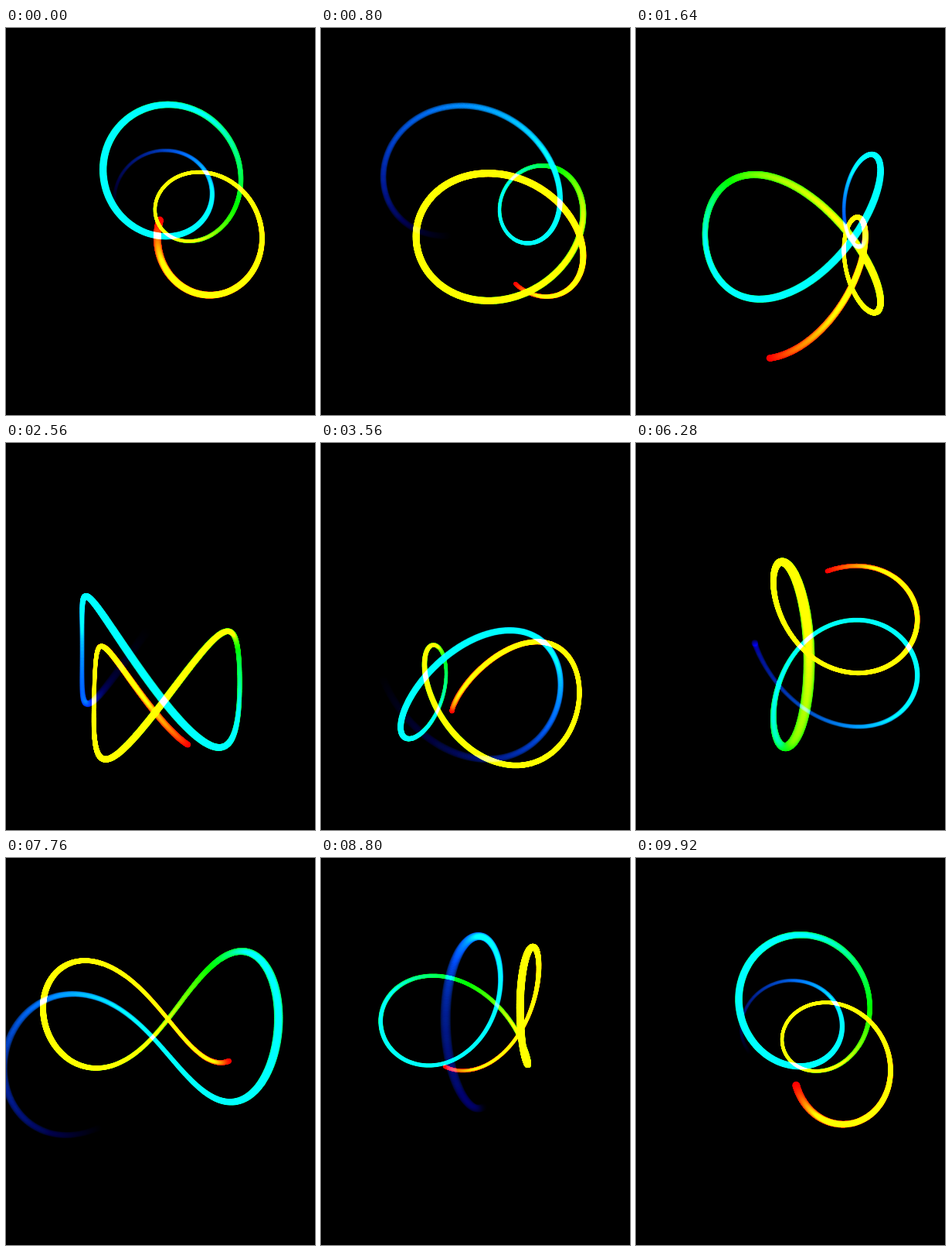
Recreate the animation shown at these times as an HTML page with a canvas. Size 400 by 500 pixels, loop 9.96 s.

```html
<!DOCTYPE html>
<html lang="en">
<head>
<meta charset="utf-8">
<title>Rainbow trail</title>
<style>
  html, body { margin: 0; width: 100%; height: 100%; overflow: hidden; background: #000; }
  canvas { display: block; }
</style>
</head>
<body>
<canvas id="stage" width="400" height="500"></canvas>
<script>
const ctx = document.getElementById('stage').getContext('2d');
const TAU = Math.PI * 2;

const LOOP = 9960;      // ms until the loop restarts
const STEP = 40;        // ms per picture
const TURN = 10;        // seconds per full turn of the figure
const TRAIL = 3.1;      // seconds of path kept visible
const SPACING = 0.002;  // seconds between dots
const HUE_SPEED = 80;   // degrees of hue per second of age

const RADIUS = 64.2;    // both circles of the epicycle
const DEPTH = 104;
const DROP = 13.3;      // figure sits a little below the eye line
const FOCAL = 282;
const DOT = 3.1;

// Position on the fixed 3D curve at a given moment in seconds.
function curve(s) {
  const a = s / TURN * TAU;
  return {
    x: RADIUS * (Math.cos(a) - Math.cos(10 * a)),
    y: RADIUS * (Math.sin(a) - Math.sin(10 * a)) + DROP,
    z: DEPTH * Math.cos(5 * a)
  };
}

function project(p, sin, cos) {
  const scale = FOCAL / (FOCAL - p.x * sin - p.z * cos);
  return {
    x: 200 + (p.x * cos - p.z * sin) * scale,
    y: 250 + p.y * scale,
    scale
  };
}

function draw(time) {
  const angle = time / TURN * TAU;
  const sin = Math.sin(angle), cos = Math.cos(angle);

  ctx.globalCompositeOperation = 'source-over';
  ctx.fillStyle = '#000';
  ctx.fillRect(0, 0, 400, 500);

  // Overlapping dots add up, which saturates the hues along the stroke.
  ctx.globalCompositeOperation = 'lighter';
  for (let age = 0; age < TRAIL; age += SPACING) {
    const p = project(curve(time - age), sin, cos);
    const hue = Math.min(240, age * HUE_SPEED);
    const alpha = 1 - age / TRAIL;
    ctx.fillStyle = `hsla(${hue.toFixed(2)}, 100%, 50%, ${alpha.toFixed(4)})`;
    ctx.beginPath();
    ctx.arc(p.x, p.y, DOT * p.scale, 0, TAU);
    ctx.fill();
  }
}

const start = performance.now();
let shown = -1;

function tick() {
  const index = Math.floor((performance.now() - start) % LOOP / STEP);
  if (index !== shown) {
    shown = index;
    draw((index + 1) * STEP / 1000);
  }
  requestAnimationFrame(tick);
}
tick();
</script>
</body>
</html>
```
